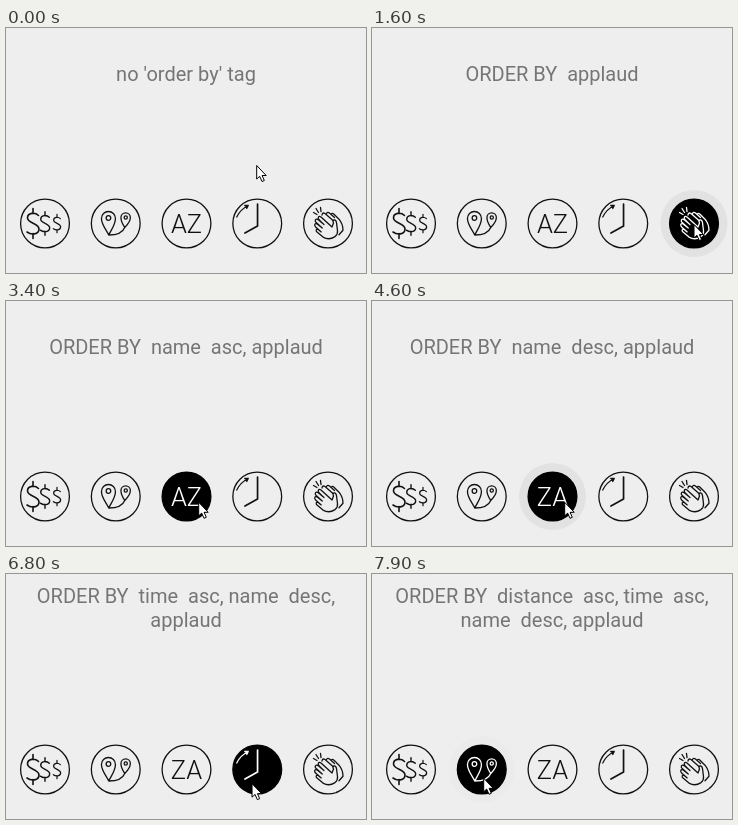
An HTML page that plays this animation: 360 by 245 pixels, repeating every 8000 ms.

```html
<!DOCTYPE html>
<html lang="en">
<meta charset="utf-8">
<title>Order by</title>
<style>
  html, body { margin: 0; height: 100%; overflow: hidden; background: #eee; }
  svg { display: block; width: 360px; height: 245px; }
  #label text { font: 20px Roboto, sans-serif; fill: #757575; text-anchor: middle; white-space: pre; }
  .icon { fill: none; stroke: #111; stroke-width: 1.3; stroke-linecap: round; stroke-linejoin: round; }
  .icon text { font: 300 25.5px Roboto, sans-serif; fill: #111; stroke: none; text-anchor: middle; }
  .on { stroke: #fff; }
  .on text { fill: #fff; }
  .on .disc { fill: #000; stroke: #000; }
</style>
<svg viewBox="0 0 360 245">
  <g id="label"><text x="180" y="29"></text><text x="180" y="53"></text></g>
  <circle id="halo" cy="195.5" r="33.5"/>

  <!-- each icon is drawn around its own centre -->
  <g class="icon" id="price">
    <path d="M5.500 -8 C2 -11.500 -5.500 -11 -5.500 -5.500 C-5.500 0 6 -.5 6 5.500 C6 11.500 -2 11.500 -6 8.500 M0 -15 V-10 M0 10 V15" vector-effect="non-scaling-stroke"/>
  </g>

  <g class="icon">
    <path d="M-7 11.500 C-10 5.500 -14.300 1 -14.300 -5 a7 7 0 0 1 14 0 C-.3 1 -4 5.500 -7 11.500 Q6 11.500 9 4 C7 1 5.200 -2 5.200 -6 a4.700 4.700 0 0 1 9.400 0 C14.600 -2 12 1 9 4"/>
    <circle cx="-7.300" cy="-5.500" r="2.300"/><circle cx="10" cy="-6" r="1.600"/>
  </g>

  <g class="icon"><text id="letters" y="9.500"></text></g>

  <g class="icon">
    <path d="M.3 -19.500 V2.500 L-12.300 9.500" stroke-width="1.7"/>
    <path d="M-20.500 -6.500 Q-17 -14 -9 -18 M-12.500 -18 H-9 L-10.500 -15"/>
  </g>

  <g class="icon" stroke-width="1">
    <path d="M4 3.500 L-7 -6.500 q-2 -1.200 -2.600 .2 t.6 2.400 l5 5 l-6 -5 q-2 -1 -2.600 .4 t.8 2.600 l6 5.400 l-5 -4 q-2 -.8 -2.400 .5 t.8 2.400 l5.600 5 l-3 -2.400 q-1.800 -.6 -2 .6 t.8 2 l6 5 q6 3.500 12 -.5 q3 -2.500 2.500 -6 l-1 -8 q-.6 -3 -2.400 -2.600 t-.6 3 z"/>
    <path d="M-6 -8.500 q.5 -3 3 -1.500 l8 7 M-1.500 -10 q1 -2 3 -.5 l5 4.500 M3 -9 q1 -2 3 -.3 l5 5 q4 5 4 11 l-4 4.500"/>
    <path d="M-14.500 -11 l3.500 2 M-12 -15 l2.500 4 M-7.500 -16 l.5 4"/>
  </g>

  <path id="cursor" d="M0 0 V13.5 L3 10.8 L5.3 16 L7.6 15 L5.4 10 H9.5 Z" fill="#fff" stroke="#000"/>
</svg>
<script>
const $ = s => document.querySelector(s);
const icons = document.querySelectorAll('.icon');
const lines = document.querySelectorAll('#label text');
const NAMES = ['price', 'distance', 'name', 'time', 'applaud'];
const centre = i => 39 + 70.75 * i;

icons.forEach((icon, i) => {
  icon.setAttribute('transform', `translate(${centre(i)} 195.5)`);
  const disc = document.createElementNS('http://www.w3.org/2000/svg', 'circle');
  disc.setAttribute('class', 'disc');
  disc.setAttribute('r', 24.4);
  icon.prepend(disc);
});

const sign = $('#price path');
for (let i = 0; i < 3; i++) {
  const copy = sign.cloneNode();
  copy.setAttribute('transform', `translate(${-12 + 12 * i} 0) scale(${.78 ** i})`);
  copy.setAttribute('stroke-width', 1.6 - .2 * i);
  $('#price').append(copy);
}
sign.remove();

// glow: halo opacity on the first tick; lag: delay of the label
const clicks = [
  { time: 1600, icon: 4, glow: .05 },
  { time: 3100, icon: 2, glow: .05 },
  { time: 4600, icon: 2, glow: .05 },
  { time: 6100, icon: 3, glow: .01, lag: 100 },
  { time: 7900, icon: 1, glow: .01 }
];
const moves = [
  { start: 300, steps: 6, x: 322, y: 196.5 },
  { start: 1900, steps: 9, x: 192.7, y: 201.3 },
  { start: 4900, steps: 5, x: 255, y: 210 },
  { start: 6700, steps: 8, x: 111.7, y: 204.3 }
];

const ease = p => p < .5 ? 4 * p ** 3 : 1 - 4 * (1 - p) ** 3;

function cursorAt(t) {
  let x = 250.7, y = 137.5;
  for (const m of moves) {
    const p = ease(Math.max(0, Math.min(1, ((t - m.start) / 100 + 1) / m.steps)));
    x += (m.x - x) * p;
    y += (m.y - y) * p;
  }
  return [x, y];
}

// A new key goes to the front; a repeated click reverses its direction.
function keysAt(t) {
  const keys = [];
  for (const { time, icon, lag = 0 } of clicks) {
    if (time + lag > t) break;
    const name = NAMES[icon], known = keys.find(k => k.name === name);
    if (known) known.dir = '  desc';
    else keys.unshift({ name, dir: name === 'applaud' ? '' : '  asc' });
  }
  return keys.map(k => k.name + k.dir);
}

function draw(now) {
  const t = Math.floor(now % 8000 / 100) * 100;
  const click = clicks.findLast(c => c.time <= t);
  const on = click ? click.icon : -1, age = click ? t - click.time : Infinity;
  icons.forEach((icon, i) => icon.classList.toggle('on', i === on));

  const keys = keysAt(t);
  const first = keys.length ? 'ORDER BY  ' + keys.slice(0, 2).join(', ') : "no 'order by' tag";
  const rest = keys.slice(2).join(', ');
  lines[0].textContent = rest && first + ',';
  lines[1].textContent = rest || first;
  $('#letters').textContent = keys.includes('name  desc') ? 'ZA' : 'AZ';

  $('#halo').setAttribute('cx', centre(on));
  $('#halo').setAttribute('opacity', age < 100 ? click.glow : age < 300 ? .05 : 0);
  $('#cursor').setAttribute('transform', `translate(${cursorAt(t)})`);
  requestAnimationFrame(draw);
}
draw(performance.now());
</script>
</html>
```
